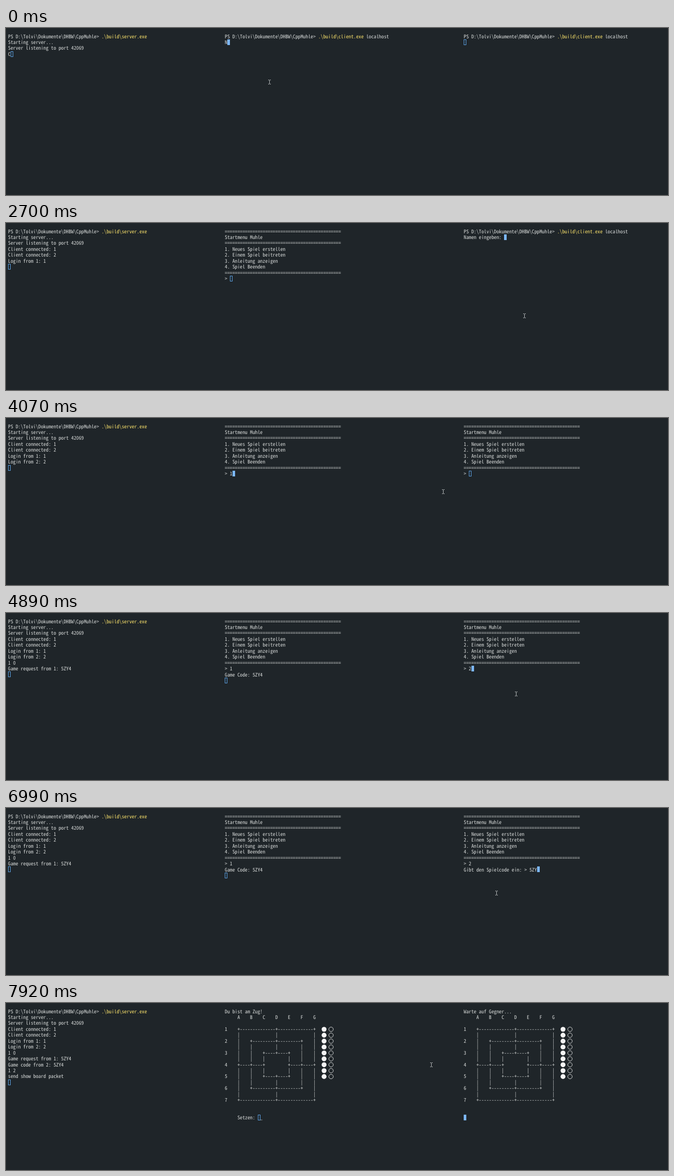
Write an HTML page that moves like this. It is 1280 by 323 pixels and loops after 8 s.

```html
<!DOCTYPE html>
<html lang="de">
<head>
<meta charset="utf-8">
<title>Terminal</title>
<style>
  html, body { margin: 0; width: 100%; height: 100%; overflow: hidden; background: #1f2529; }
  .pane { position: absolute; top: 0; }
  pre {
    position: absolute; top: 10.57px; left: 0; margin: 0;
    font-family: "Noto Sans Mono CJK JP", "Noto Sans Mono CJK SC", "DejaVu Sans Mono", monospace;
    line-height: 11.43px;
    text-rendering: geometricPrecision;
    font-kerning: none;
    font-variant-ligatures: none;
    color: #d8dbda;
  }
  pre b { font-weight: 400; color: #fbe36c; }
  .cursor {
    position: absolute; width: 5px; height: 11px;
    box-sizing: border-box; border: 1px solid #5a9fe0;
  }
  .cursor.solid { background: #7cb7fb; border-color: #7cb7fb; }
  svg { position: absolute; left: 0; top: 0; overflow: visible; }
</style>
</head>
<body>
<svg id="mouse" width="5" height="9" fill="none" stroke="#b8bcbd">
  <path d="M0 .5H2M3 .5H5M0 8.5H2M3 8.5H5M2.5 1V8"/>
</svg>
<script>
const LOOP = 8000, CHAR_W = 4.885, ROW_H = 11.43, TOP = 10.57;
const BOARD_TIME = 7920, MOUSE_STEP = 120;

// "@" marks the place of the text cursor.
const prompt = (cmd) => `PS D:\\Tolvi\\Dokumente\\DHBW\\CppMuhle> .\\build\\${cmd}\n`;
const client = prompt("client.exe localhost");
const askName = client + "Namen eingeben: ";

const rule = "=".repeat(46) + "\n";
const menu = rule + "Startmenu Muhle\n" + rule +
  "1. Neues Spiel erstellen\n2. Einem Spiel beitreten\n" +
  "3. Anleitung anzeigen\n4. Spiel Beenden\n" + rule + "> ";

const gap = (n) => " ".repeat(n);
const edge = (n) => "+" + "-".repeat(n) + "+" + "-".repeat(n) + "+";
const columns = [..."ABCDEFG"];
const bars = (cols) => gap(5) + columns.map((c) => (cols.includes(c) ? "|" : " ")).join(gap(4));

function board(title) {
  const half = [
    edge(14), bars("ADG"),
    "|    " + edge(9) + "    |", bars("ABDFG"),
    "|    |    " + edge(4) + "    |    |", bars("ABCEFG"),
  ];
  const lines = [...half, edge(4) + gap(9) + edge(4), ...half.reverse()];
  const rows = lines.map((s, i) => (i % 2 ? s : i / 2 + 1 + gap(4) + s));
  return [title, gap(5) + columns.join(gap(4)), "", ...rows, "", "", ""].join("\n");
}

// Steps are [time, text] pairs.
const typing = (base, keys, start, delay = 0) =>
  [...keys].map((_, i) => [start + i * delay, base + keys.slice(0, i + 1) + "@"]);

function logging(base, entries) {
  let text = base;
  return entries.map(([time, lines]) => [time, (text += lines + "\n") + "@"]);
}

const boot = prompt("server.exe") + "Starting server...\nServer listening to port 42069\n";
const panes = [
  { x: 4, steps: [
    [0, boot + "C@"],
    ...logging(boot, [
      [120, "Client connected: 1"],
      [830, "Client connected: 2"],
      [2070, "Login from 1: 1"],
      [3400, "Login from 2: 2"],
      [4220, "1 0\nGame request from 1: 5ZY4"],
      [BOARD_TIME, "Game code from 2: 5ZY4\n1 2\nsend show board packet"],
    ]),
  ] },
  { x: 423, steps: [
    [0, client + "N@"],
    [120, askName + "@"],
    ...typing(askName, "1", 1790),
    [2070, menu + "@"],
    ...typing(menu, "1", 3950),
    [4220, menu + "1\nGame Code: 5ZY4\n@"],
    [BOARD_TIME, board("Du bist am Zug!") + gap(5) + "Setzen: @_"],
  ] },
  { x: 885, steps: [
    [0, client + "@"],
    [830, askName + "@"],
    ...typing(askName, "2", 2980),
    [3400, menu + "@"],
    ...typing(menu, "2", 4890),
    [5290, menu + "2\nGibt den Spielcode ein: > @"],
    ...typing(menu + "2\nGibt den Spielcode ein: > ", "5ZY4", 6120, 435),
    [BOARD_TIME, board("Warte auf Gegner...") + "@"],
  ] },
];

// The pane that is clicked gets the solid cursor.
const focus = [[0, 1], [2700, 2], [3640, 1], [4490, 2]];

const moves = [
  { start: 0, steps: 1, x: 509, y: 104 },
  { start: 2220, steps: 5, x: 1002, y: 179 },
  { start: 3130, steps: 3, x: 714, y: 114 },
  { start: 3520, steps: 2, x: 698, y: 131 },
  { start: 4070, steps: 2, x: 991, y: 153 },
  { start: 4890, steps: 1, x: 986, y: 156 },
  { start: 5010, steps: 5, x: 948, y: 164 },
  { start: 7770, steps: 1, x: 914, y: 102 },
  { start: 7920, steps: 1, x: 822, y: 119 },
];

const at = (steps, t) => steps.findLast((s) => s[0] <= t)[1];
const smooth = (p) => p * p * (3 - 2 * p);

function pointer(t) {
  const i = moves.findLastIndex((m) => m.start <= t);
  const to = moves[i], from = moves[i - 1] || to;
  const done = Math.floor((t - to.start) / MOUSE_STEP) + 1;
  const p = smooth(Math.min(1, done / to.steps));
  return [from.x + (to.x - from.x) * p, from.y + (to.y - from.y) * p].map(Math.round);
}

function stones() {
  let out = "";
  for (let row = 3; row < 12; row++) {
    const y = TOP + row * ROW_H + 6;
    out += `<circle cx="192" cy="${y}" r="4.7" fill="#f4f4f4"/>` +
      `<circle cx="205.5" cy="${y}" r="4.3" fill="none" stroke="#d8dada"/>`;
  }
  return `<svg class="stones" width="1" height="1">${out}</svg>`;
}

// Font size at which one character fills one terminal cell.
function cellFontSize(el) {
  const ctx = document.createElement("canvas").getContext("2d");
  ctx.font = "100px " + getComputedStyle(el).fontFamily;
  return (100 * CHAR_W) / ctx.measureText("0").width;
}

for (const p of panes) {
  p.el = document.createElement("div");
  p.el.className = "pane";
  p.el.style.left = p.x + "px";
  p.el.innerHTML = "<pre></pre><div class='cursor'></div>" + (p === panes[0] ? "" : stones());
  [p.pre, p.cursor, p.stones] = p.el.children;
  document.body.prepend(p.el);
  p.pre.style.fontSize = cellFontSize(p.pre) + "px";
}

function show(p, text) {
  if (p.text === text) return;
  p.text = text;
  const before = text.split("@")[0].split("\n");
  p.pre.innerHTML = text.replace("@", text.endsWith("@") ? "" : " ").replaceAll(">", "&gt;")
    .replace(/\.\\build\\\w+\.exe/, "<b>$&</b>");
  p.cursor.style.left = Math.round(before.at(-1).length * CHAR_W) + "px";
  p.cursor.style.top = Math.round(TOP + (before.length - 1) * ROW_H) + "px";
}

const mouse = document.getElementById("mouse");

function draw(now) {
  const t = now % LOOP;
  const active = at(focus, t);
  panes.forEach((p, i) => {
    show(p, at(p.steps, t));
    p.cursor.classList.toggle("solid", i === active);
    if (p.stones) p.stones.style.display = t >= BOARD_TIME ? "" : "none";
  });
  const [x, y] = pointer(t);
  mouse.style.transform = `translate(${x - 2}px, ${y - 4}px)`;
  requestAnimationFrame(draw);
}
draw(0);
</script>
</body>
</html>
```
